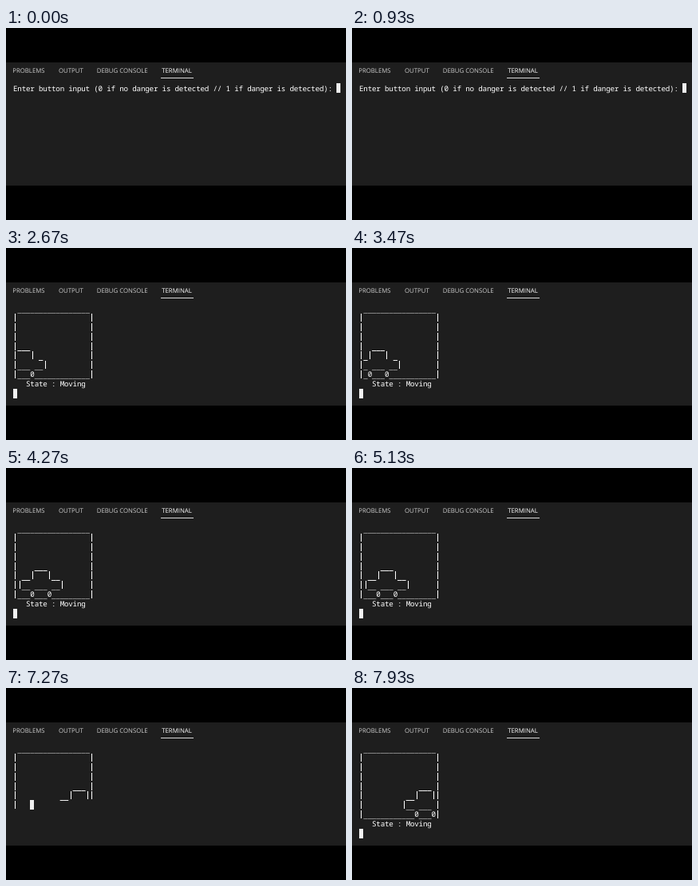
Animation of 426 by 240 pixels, one loop 8 s. Source, as an HTML page with a canvas:

```html
<!DOCTYPE html>
<html lang="en">
<head>
<meta charset="utf-8">
<title>Terminal car</title>
<style>
  html, body { margin: 0; width: 100%; height: 100%; overflow: hidden; background: #000; }
  canvas { display: block; width: 426px; height: 240px; }
</style>
</head>
<body>
<canvas id="stage" width="426" height="240"></canvas>
<script>
const ctx = document.getElementById('stage').getContext('2d');
const LOOP = 8000, FPS = 15;
const LEFT = 9, TOP = 69.3, CELL_W = 5.33, CELL_H = 11.83;
const INNER = 17;               // columns between the side walls
const CHARS_PER_TICK = 124;     // terminal output speed
const STEP_TICKS = 15.6, FIRST_STEP = 14.4;
const CAR_COLUMNS = [-5, -3, -1, 1, 4, 7, 10];
const PROMPT = 'Enter button input (0 if no danger is detected // 1 if danger is detected): ';
const CAR = ['    ___    ', ' __|   |__ ', '|__ ___ __|', '   0   0   '];
const ENTERING_CAR = CAR.map((line, i) => i === 1 ? ' __|   | _ ' : line);

function scene(carColumn) {
  const rows = [' ' + '_'.repeat(INNER) + ' '];
  const car = carColumn < 0 ? ENTERING_CAR : CAR;
  for (let r = 1; r <= 7; r++) {
    const inside = Array(INNER).fill(r === 7 ? '_' : ' ');
    [...(car[r - 4] || '')].forEach((ch, i) => {
      const column = carColumn + i - 1;
      if (ch !== ' ' && column >= 0 && column < INNER) inside[column] = ch;
    });
    rows.push('|' + inside.join('') + '|');
  }
  return rows.join('\n') + '\n   State : Moving\n';
}

function drawChar(ch, col, row) {
  const x = LEFT + col * CELL_W, y = TOP + row * CELL_H;
  ctx.fillStyle = '#fff';
  if (ch === '_') {
    ctx.fillStyle = row === 4 || row === 5 ? '#f0f0f0' : '#858585';
    ctx.fillRect(x, Math.round(81.2 + row * 11.75), CELL_W, 1);
  } else if (ch === '|') {
    ctx.fillRect(Math.round(x + 2.4), Math.round(y + 1), 1, 10);
  } else if (ch !== ' ') {
    ctx.fillText(ch, x, Math.round(y + 9.3));
  }
}

function drawTerminal(text) {
  ctx.font = '500 9.2px "Noto Sans Mono", monospace';
  let col = 0, row = 0;
  for (const ch of text) {
    if (ch === '\n') { row++; col = 0; }
    else drawChar(ch, col++, row);
  }
  ctx.fillStyle = '#f0f0f0';
  ctx.fillRect(Math.round(LEFT + col * CELL_W), Math.round(TOP + row * CELL_H), 5, 12);
}

function drawPanel() {
  ctx.fillStyle = '#000';
  ctx.fillRect(0, 0, 426, 240);
  ctx.fillStyle = '#1e1e1e';
  ctx.fillRect(0, 43, 426, 154);
  ctx.font = '7.8px "Open Sans", "Noto Sans", sans-serif';
  ctx.fillStyle = '#ccc';
  ctx.fillText('PROBLEMS', 8.2, 56);
  ctx.fillText('OUTPUT', 66, 56);
  ctx.fillText('DEBUG CONSOLE', 113.8, 56);
  ctx.fillStyle = '#fff';
  ctx.fillText('TERMINAL', 195.2, 56);
  ctx.fillStyle = '#d8d8d8';
  ctx.fillRect(194, 62, 41, 1);
}

function frame(now) {
  const tick = Math.floor((now % LOOP) * FPS / 1000);
  const elapsed = tick - FIRST_STEP;
  const step = Math.min(Math.floor(elapsed / STEP_TICKS + 1e-6), CAR_COLUMNS.length - 1);
  ctx.textRendering = 'geometricPrecision';
  drawPanel();
  if (step < 0) {
    drawTerminal(PROMPT);
  } else {
    const shown = Math.max(0, Math.round((elapsed - step * STEP_TICKS) * CHARS_PER_TICK));
    drawTerminal(scene(CAR_COLUMNS[step]).slice(0, shown));
  }
}

const start = performance.now();
(function loop() {
  frame(performance.now() - start);
  requestAnimationFrame(loop);
})();
</script>
</body>
</html>
```
